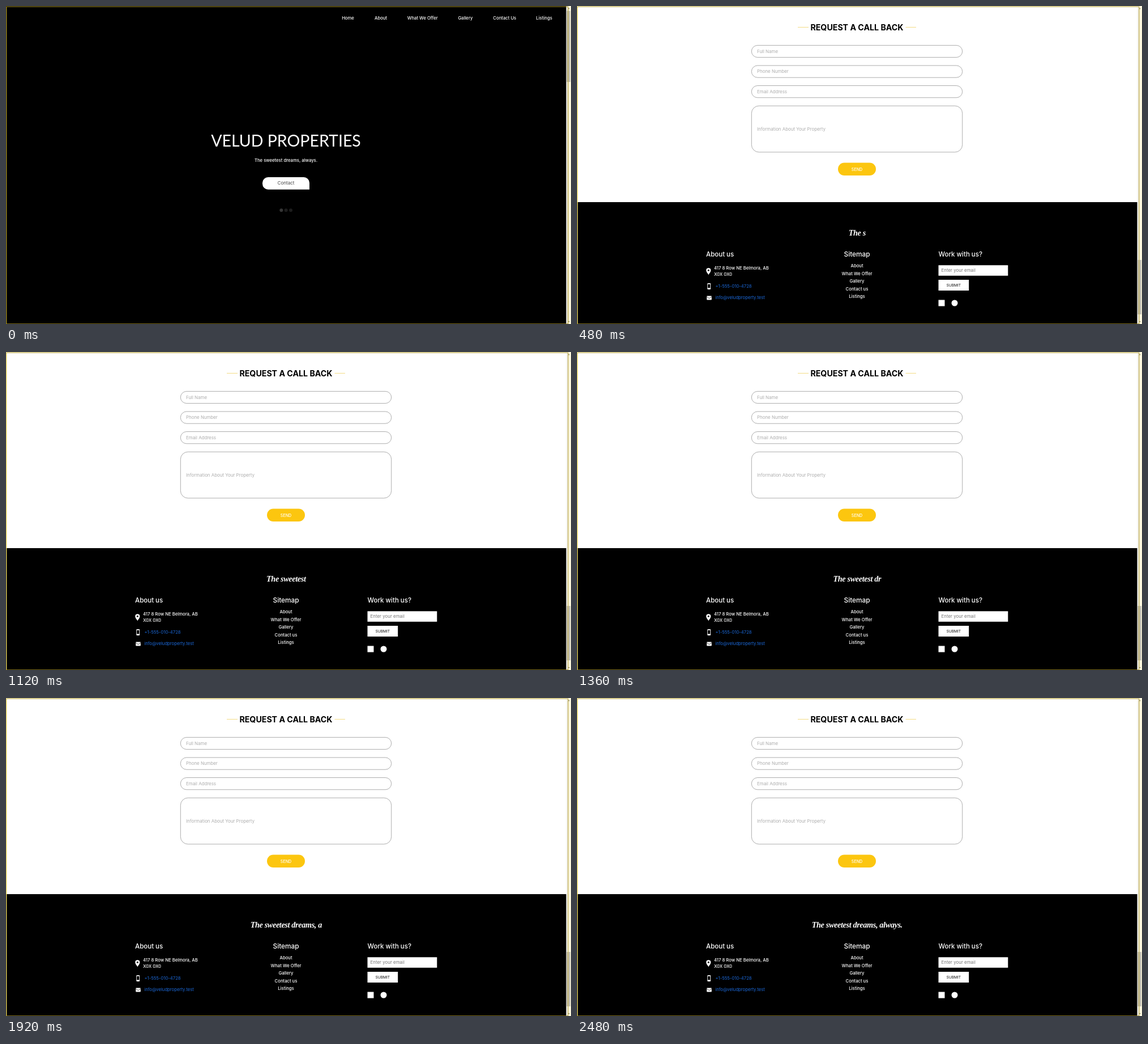
An HTML page that plays this animation: 998 by 561 pixels, repeating every 3040 ms.

```html
<!DOCTYPE html>
<html lang="en">
<head>
<meta charset="utf-8">
<title>Landing page and footer</title>
<style>
  html, body { margin: 0; width: 100%; height: 100%; overflow: hidden; background: #fff; }
  svg { display: block; width: 998px; height: 561px; }
  text { font: 500 7.7px Inter, "Open Sans", sans-serif; fill: #fff; }
  .mid { text-anchor: middle; }
  .title { font: 400 28.5px Lato, "Open Sans", sans-serif; }
  .head { font-size: 14.2px; font-weight: 700; fill: #000; }
  .col { font-size: 11.5px; }
  .hint { font-size: 7.9px; font-weight: 400; fill: #adadad; }
  .link { fill: #1b68d8; font-weight: 400; }
  .script { font: italic 700 14.2px "Liberation Serif", "Noto Serif", serif; letter-spacing: -.35px; }
  .field { fill: #fff; stroke: #999; stroke-width: .8; }
</style>
</head>
<body>
<svg viewBox="0 0 998 561">
  <rect width="998" height="561" fill="#fbf6dc"/>
  <rect x="989" width="4" height="561" fill="#f3f2ec"/>

  <g id="hero">
    <rect width="989.5" height="561"/>
    <g id="nav"></g>
    <text class="title mid" x="494.5" y="247.7">VELUD PROPERTIES</text>
    <text class="mid" x="494.5" y="274.8">The sweetest dreams, always.</text>
    <path d="M463 302H526a10 10 0 0 1 10 10V323.7H463a10 10 0 0 1-10-10V312a10 10 0 0 1 10-10z" fill="#fff"/>
    <text class="mid" x="494.5" y="315.4" style="font-size:8.1px;font-weight:400;fill:#444">Contact</text>
    <circle cx="486.3" cy="360.3" r="3" fill="#363636"/>
    <circle cx="494.6" cy="360.3" r="3" fill="#1d1d1d"/>
    <circle cx="503" cy="360.3" r="3" fill="#1d1d1d"/>
  </g>

  <g id="page">
    <rect x="1" y="2" width="988.5" height="345" fill="#fff"/>
    <path d="M390 37.5h19M580.5 37.5h18.5" stroke="#f3dc86"/>
    <text class="head mid" x="494.5" y="42.7">REQUEST A CALL BACK</text>
    <g id="form"></g>
    <rect x="461" y="276.5" width="67" height="22.5" rx="11.2" fill="#fcc60f"/>
    <text class="mid" x="494.5" y="290.5" style="font-size:7.1px">SEND</text>

    <rect x="1" y="346" width="988.5" height="215"/>
    <text id="typed" class="script mid" x="494.8" y="404.6"></text>
    <g id="foot">
      <text class="col" x="228" y="442.3">About us</text>
      <text class="col mid" x="494.5" y="442.3" style="font-size:11.8px">Sitemap</text>
      <text class="col" x="638.5" y="442.3">Work with us?</text>

      <path d="M232.3 474.3c-1.4-2.6-4.1-5-4.1-8a4.1 4.1 0 0 1 8.2 0c0 3-2.7 5.4-4.1 8z" fill="#fff"/>
      <circle cx="232.3" cy="466.2" r="1.5"/>
      <text x="242" y="465.3">417 8 Row NE Belmora, AB</text>
      <text x="242" y="476.2">X0X 0X0</text>

      <rect x="230.3" y="489" width="5.8" height="11" rx="1.2" fill="#fff"/>
      <path d="M231.2 490.7h4v6.7h-4z"/>
      <text class="link" x="244.5" y="497">+1-555-010-4728</text>

      <rect x="229.2" y="511.6" width="8.6" height="7" rx=".8" fill="#fff"/>
      <path d="M229.2 512.9l4.3 2.9 4.3-2.9" fill="none" stroke="#000" stroke-width=".7"/>
      <text class="link" x="244.3" y="517.3">info@veludproperty.test</text>

      <g id="links"></g>

      <rect x="638.5" y="457.3" width="122.8" height="18.5" fill="#fff"/>
      <text class="hint" x="643.5" y="469" style="fill:#777">Enter your email</text>
      <rect x="638.5" y="483" width="53.7" height="19" fill="#fff"/>
      <text class="mid" x="665.3" y="495" style="font-size:6.7px;font-weight:400;fill:#111">SUBMIT</text>
      <rect x="638.5" y="518.5" width="11" height="11" fill="#fff"/>
      <circle cx="667" cy="524" r="5.5" fill="#fff"/>

      <path d="M383 565.7h223" stroke="#ddd"/>
      <text class="mid" x="494.5" y="583.3" style="font-size:8px">Proudly Canadian</text>
    </g>
  </g>

  <rect id="thumb" x="989.8" width="7.2" fill="#c6c3b6"/>
  <path d="M992.7 5.3h3l-1.500-1.8zM992.7 556h3l-1.5 1.8z" fill="#77734f"/>
  <path id="side" d="M.7 2V561"  stroke-width="1.3"/>
  <path id="frame" d="M0 1.3H992.8V561" fill="none" stroke-width="1.1"/>
  <path d="M0 560.6h993" stroke="#a58f1f" stroke-width=".8"/>
</svg>

<script>
const $ = id => document.getElementById(id);
const add = (parent, tag, attrs, text = "") => {
  const el = document.createElementNS(parent.namespaceURI, tag);
  for (const key in attrs) el.setAttribute(key, attrs[key]);
  el.textContent = text;
  parent.append(el);
};

const nav = [["Home", 604], ["About", 662], ["What We Offer", 735.7],
  ["Gallery", 811.4], ["Contact Us", 880.8], ["Listings", 950.6]];
nav.forEach(([label, x]) => add($("nav"), "text", { class: "mid", x, y: 23.8 }, label));

const fields = [["Full Name", 69.4, 21.2, 10.6], ["Phone Number", 105, 21.2, 10.6],
  ["Email Address", 140.5, 21.2, 10.6], ["Information About Your Property", 176.2, 81.6, 13]];
fields.forEach(([label, y, height, rx]) => {
  add($("form"), "rect", { class: "field", x: 308.3, y, width: 372.4, height, rx });
  add($("form"), "text", { class: "hint", x: 318, y: y + height / 2 + 2.7 }, label);
});

["About", "What We Offer", "Gallery", "Contact us", "Listings"].forEach((label, i) =>
  add($("links"), "text", { class: "mid", x: 494.5, y: 461 + i * 13.5 }, label));

const LOOP = 3040, STEP = 80;
const slogan = "The sweetest dreams, always.";

// Typing runs one letter per step, with a short stall inside "sweetest".
const typedCount = k => k === 11 ? 9 : k < 13 ? k - 1 : k - 2;

function draw(ms) {
  const k = Math.floor((ms % LOOP) / STEP);
  const top = k === 0;
  const empty = k === 1;
  $("hero").style.display = top ? "" : "none";
  $("page").style.display = top ? "none" : "";
  $("typed").textContent = slogan.slice(0, Math.max(0, typedCount(k))).trimEnd();
  $("foot").setAttribute("transform", `translate(0 ${empty ? -20.4 : 0})`);
  $("thumb").setAttribute("y", top ? 8.5 : empty ? 451 : 448);
  $("thumb").setAttribute("height", top ? 125.5 : 96);
  $("frame").setAttribute("stroke", top ? "#a58f1f" : "#b5a03c");
  $("side").setAttribute("stroke", top ? "#a58f1f" : "#e3cf55");
}

const start = performance.now();
function tick() {
  draw(Math.max(0, performance.now() - start));
  requestAnimationFrame(tick);
}
tick();
</script>
</body>
</html>
```
